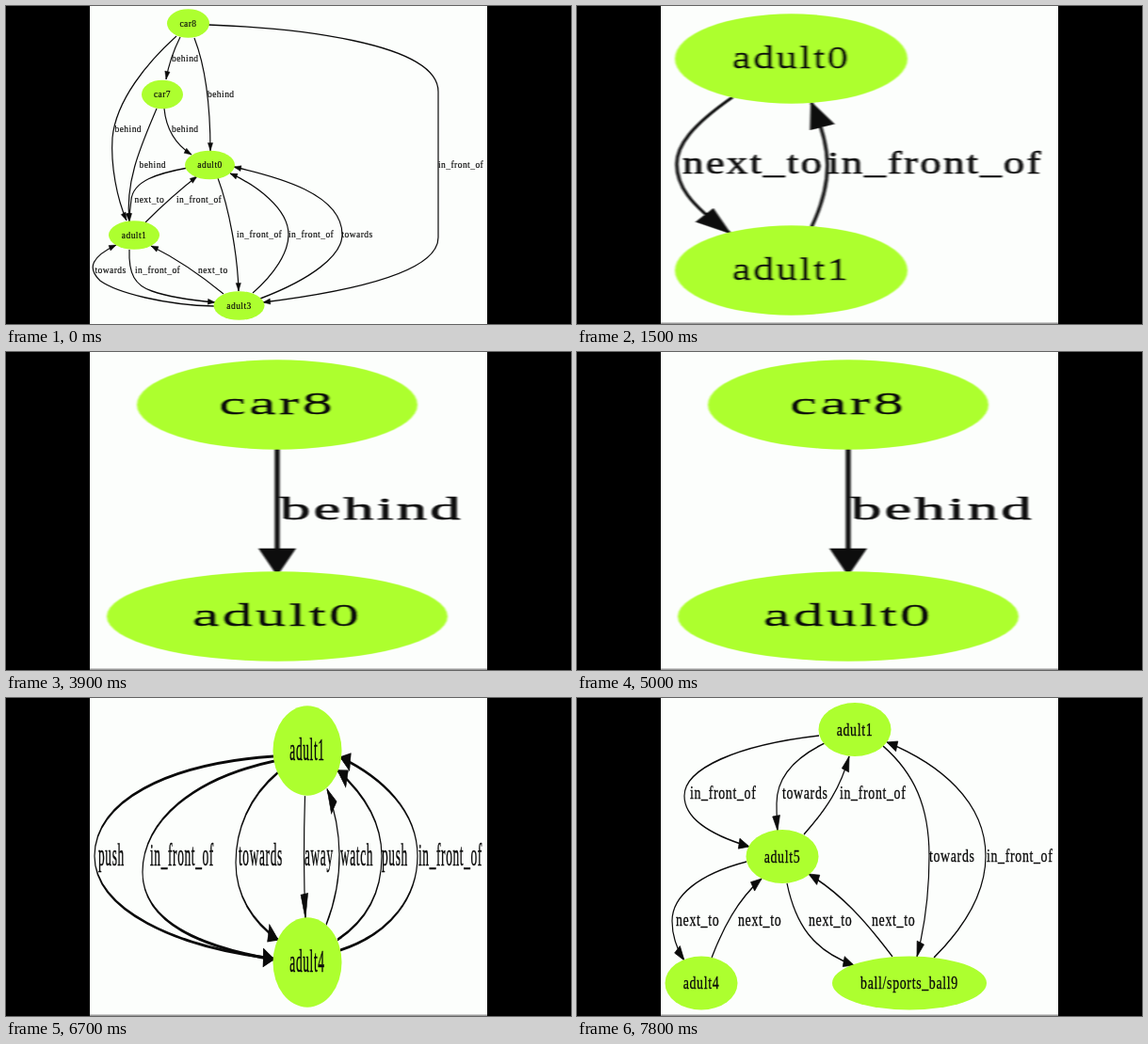
These frames come from a looping animation (600 by 338 pixels, 8000 ms). An HTML page:

```html
<!DOCTYPE html>
<html lang="en">
<head>
<meta charset="utf-8">
<title>Relation graphs</title>
<style>
  html, body { margin: 0; width: 100%; height: 100%; overflow: hidden; background: #000; }
  svg { display: block; width: 100%; height: 100%; }
  .scene { visibility: hidden; filter: url(#soft); }
  .scene.on { visibility: visible; }
  ellipse { fill: #adff2f; }
  path.edge { fill: none; stroke: #0a0a0a; marker-end: url(#arrow); }
  text {
    font: 12.5px "Liberation Serif", "Times New Roman", serif;
    letter-spacing: 0.6px;
    fill: #0a0a0a;
    stroke: #0a0a0a;
    stroke-width: 0.2;
  }
  .node { text-anchor: middle; }
</style>
</head>
<body>
<svg id="stage" viewBox="0 0 600 338">
  <defs>
    <marker id="arrow" markerUnits="userSpaceOnUse" markerWidth="10" markerHeight="8"
            refX="10" refY="4" orient="auto" overflow="visible">
      <path d="M0,0.5L10,4L0,7.5Z" fill="#0a0a0a" stroke="#0a0a0a" stroke-width="0.5"/>
    </marker>
    <filter id="soft"><feGaussianBlur stdDeviation="0.25"/></filter>
  </defs>
  <rect width="600" height="338" fill="#000"/>
  <rect x="89" width="422" height="338" fill="#fcfefc"/>
  <rect id="rule" x="89" y="336.5" width="422" height="1.5" fill="#999"/>
</svg>
<script>
const LOOP = 8000;
const stage = document.getElementById('stage');
const rule = document.getElementById('rule');
const scenes = [];

function add(parent, tag, attrs, text) {
  const el = document.createElementNS('http://www.w3.org/2000/svg', tag);
  for (const key in attrs) el.setAttribute(key, attrs[key]);
  if (text) el.textContent = text;
  parent.appendChild(el);
  return el;
}

// Each graph is laid out in points and stretched as a whole to fill the panel;
// positions are given in stage pixels, as x,y pairs.
function scene(start, sx, sy) {
  const group = add(stage, 'g', { class: 'scene', transform: `scale(${sx} ${sy})` });
  const edges = add(group, 'g', { 'stroke-width': Math.max(1, 1.2 / sx) });
  const nodes = add(group, 'g');
  const graph = {
    start, group,
    node(label, x, y, rx) {
      add(nodes, 'ellipse', { cx: x / sx, cy: y / sy, rx: rx / sx, ry: 18 });
      add(nodes, 'text', { class: 'node', x: x / sx, y: y / sy + 3.9 }, label);
      return graph;
    },
    edge(label, x, y, path) {
      let i = 0;
      const d = path.replace(/[\d.]+/g, n => (n / (i++ % 2 ? sy : sx)).toFixed(2));
      add(edges, 'path', { class: 'edge', d });
      add(edges, 'text', { x: x / sx, y: y / sy + 3.9 }, label);
      return graph;
    }
  };
  scenes.push(graph);
  return graph;
}

scene(0, 0.76, 0.85)
  .node('car8', 193.5, 18.5, 22.5)
  .node('car7', 166, 94, 22)
  .node('adult0', 216.5, 169, 26.5)
  .node('adult1', 136, 243.5, 27)
  .node('adult3', 247.5, 318.5, 27)
  .edge('behind', 176, 56, 'M185,33C179,45 173,60 170,78')
  .edge('behind', 214, 94, 'M200,34C212,65 217,110 217,154')
  .edge('behind', 115.5, 131, 'M181,32C150,60 117,100 113,140C111,170 118,205 128,228')
  .edge('in_front_of', 459, 169,
        'M215,20C300,23 459,38 459,91L459,246C459,287 345,306 273,315')
  .edge('behind', 176, 131, 'M168,109C170,130 180,147 197,158')
  .edge('behind', 141.5, 169, 'M160,109C145,145 126,185 131,229')
  .edge('next_to', 136.5, 206, 'M193,172C160,178 135,186 133,206C132,215 131,220 131,229')
  .edge('in_front_of', 181, 206, 'M148,230C168,210 185,195 203,181')
  .edge('in_front_of', 245, 243, 'M225,183C237,215 246,265 247,303')
  .edge('in_front_of', 300, 243, 'M262,305C285,285 300,262 300,243C300,215 265,190 238,178')
  .edge('towards', 356.5, 243, 'M270,311C325,290 357,265 357,243C357,200 290,182 242,171')
  .edge('in_front_of', 137, 281, 'M131,259C130,285 137,297 155,303C175,310 200,313 222,315')
  .edge('next_to', 204, 281, 'M231,306C208,287 180,268 154,255')
  .edge('towards', 94.5, 281, 'M221,319C170,318 118,305 100,292C85,278 92,266 117,254');

scene(1300, 3.6, 2.65)
  .node('adult0', 227.5, 56, 123.5)
  .node('adult1', 227.5, 281, 123.5)
  .edge('next_to', 112, 168, 'M165,97C122,127 106,148 106,168C106,190 118,210 162,241')
  .edge('in_front_of', 266, 168, 'M249,235C273,185 270,150 249,103');

scene(2500, 3.66, 1.585)
  .node('car8', 228.5, 33.5, 105)
  .node('adult0', 228.5, 168.5, 126)
  .node('adult1', 228.5, 303, 126)
  .edge('behind', 231, 101, 'M228.5,62L228.5,141')
  .edge('behind', 118.5, 236, 'M167,194C130,208 112,222 112,236C112,250 130,264 166,279')
  .edge('in_front_of', 261, 236, 'M248,275C266,250 266,222 246,196');

scene(3900, 5.18, 2.65)
  .node('car8', 288, 56, 149)
  .node('adult0', 288, 281, 181)
  .edge('behind', 291, 168, 'M288,103L288,236');

scene(6000, 1.07, 2.65)
  .node('adult1', 320, 56, 36.5)
  .node('adult4', 320, 281, 36.5)
  .edge('push', 98, 168, 'M284,62C170,70 94,110 94,168C94,225 180,265 284,277')
  .edge('in_front_of', 153, 168, 'M285,67C200,85 145,130 145,185C145,240 210,265 284,278')
  .edge('towards', 247, 168, 'M289,79C258,105 244,140 244,175C244,210 262,238 289,257')
  .edge('away', 317, 168, 'M317.5,104C316,150 316,190 318,235')
  .edge('watch', 355, 168, 'M340,241C360,190 357,140 341,97')
  .edge('push', 399, 168, 'M352,257C385,235 399,205 399,168C399,130 378,100 352,77')
  .edge('in_front_of', 438, 168, 'M355,268C410,250 437,210 437,168C437,120 400,85 355,63');

scene(6900, 0.99, 1.585)
  .node('adult1', 278, 33.5, 34)
  .node('adult4', 194, 168.5, 34)
  .node('adult5', 318, 303, 34)
  .edge('in_front_of', 99, 101, 'M244,39C150,45 93,70 93,103C93,128 125,148 163,160')
  .edge('away', 187, 101, 'M248,42C205,55 182,75 182,105C182,118 183,128 186,141')
  .edge('in_front_of', 240, 101, 'M207,143C222,115 243,88 261,58')
  .edge('in_front_of', 318, 168, 'M292,60C316,110 322,200 319,275')
  .edge('towards', 390, 168, 'M306,50C350,75 390,115 390,168C390,210 368,250 338,280')
  .edge('in_front_of', 444, 168, 'M345,288C400,262 443,220 443,168C443,100 375,60 310,40')
  .edge('next_to', 195, 236, 'M189,197C186,260 215,295 285,302')
  .edge('next_to', 261, 236, 'M296,281C265,255 232,220 213,193');

scene(7600, 1.11, 1.585)
  .node('adult1', 295, 33.5, 38.5)
  .node('adult5', 218, 168.5, 38.5)
  .node('adult4', 132, 303, 38.5)
  .node('ball/sports_ball9', 353, 303, 82)
  .edge('in_front_of', 120, 101, 'M257,40C170,50 114,75 114,104C114,132 150,148 183,158')
  .edge('towards', 218, 101, 'M263,48C230,64 212,85 212,112C212,122 212,130 213,141')
  .edge('in_front_of', 279, 101, 'M241,145C265,118 280,95 289,62')
  .edge('towards', 374, 168, 'M325,51C358,80 374,115 374,168C374,205 370,240 361,275')
  .edge('in_front_of', 435, 168, 'M379,276C415,240 434,205 434,168C434,110 385,70 329,47')
  .edge('next_to', 105, 236, 'M180,174C130,187 101,210 101,237C101,252 105,265 114,279')
  .edge('next_to', 171, 236, 'M143,276C155,245 170,215 196,192')
  .edge('next_to', 246, 236, 'M223,197C232,240 250,268 294,284')
  .edge('next_to', 313, 236, 'M335,275C305,235 280,208 246,187');

const t0 = performance.now();

function draw() {
  const t = (performance.now() - t0) % LOOP;
  const current = scenes.filter(s => s.start <= t).pop();
  for (const s of scenes) s.group.classList.toggle('on', s === current);
  rule.style.visibility = current === scenes[0] ? 'hidden' : 'visible';
  requestAnimationFrame(draw);
}
draw();
</script>
</body>
</html>
```
